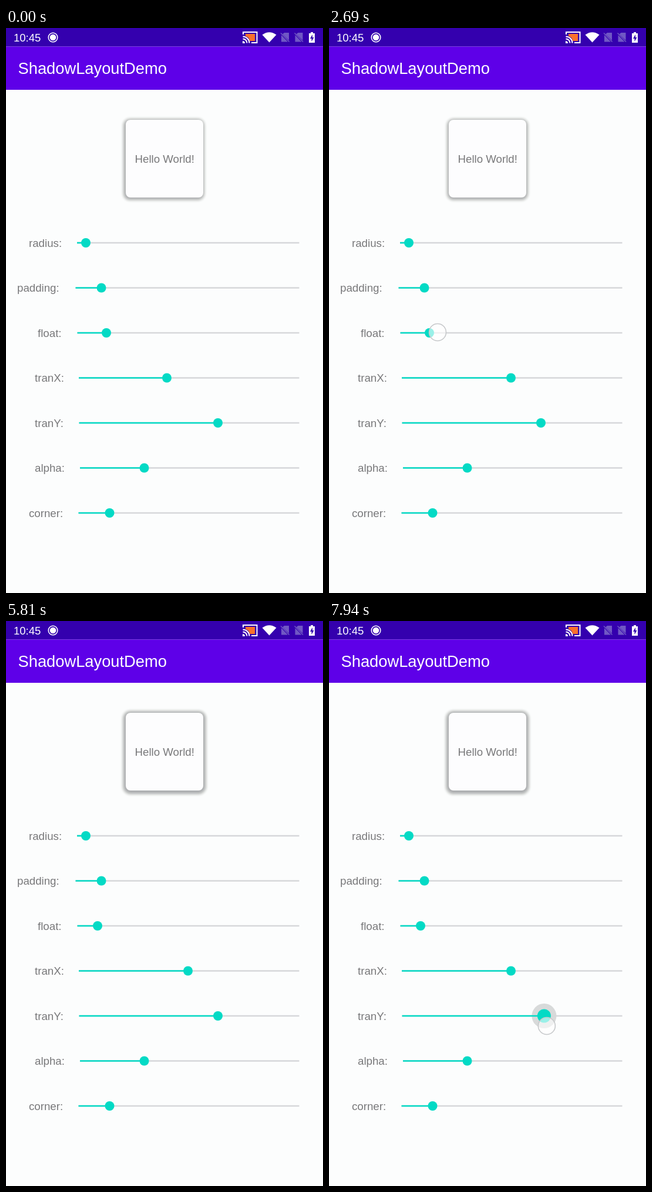
Write an HTML page that moves like this. It is 540 px wide and 960 px high and loops after 8 s.

```html
<!DOCTYPE html>
<html lang="en">
<head>
<meta charset="utf-8">
<title>ShadowLayoutDemo</title>
<style>
  html, body { margin: 0; width: 100%; height: 100%; overflow: hidden; background: #fcfdfd; }
  svg { position: absolute; left: 0; top: 0; }
  text { font-family: "Liberation Sans", Arial, sans-serif; font-size: 18.7px; fill: #78787a; }
  #card { position: absolute; left: 204px; top: 156px; width: 132px; height: 132px;
          border-radius: 8px; background: #fdfdfe; }
</style>
</head>
<body>
<div id="card"></div>
<svg id="stage" width="540" height="960" viewBox="0 0 540 960">
  <rect width="540" height="31.5" fill="#3400ae"/>
  <rect y="31.5" width="540" height="73.5" fill="#5e00e8"/>
  <text x="13" y="22.5" style="font-size:18.5px;fill:#fff">10:45</text>
  <text x="20.5" y="78" style="font-size:27.3px;fill:#fff">ShadowLayoutDemo</text>
  <circle cx="80" cy="16" r="7.8" fill="none" stroke="#fff" stroke-width="1.6"/>
  <circle cx="80" cy="16" r="5.3" fill="#fff"/>
  <!-- cast, wifi, two empty SIM slots, battery -->
  <path d="M408 10H424V22H415Q414 15 408 14Z" fill="#f8702c"/>
  <path d="M404 11V7H427.5V25H418M403.5 14.5A11 11 0 0 1 414.5 25.5M403.5 18.5A7 7 0 0 1 410.5 25.5" fill="none" stroke="#fff" stroke-width="2"/>
  <path d="M403 22A4 4 0 0 1 407 26H403Z" fill="#fff"/>
  <path d="M448.5 24.5L436.5 11.5Q448.5 3 460.5 11.5Z" fill="#fff"/>
  <g id="sim" fill="#7058c4">
    <path d="M474 8H482V21L471 10.5ZM469 12L480 23.5H469Z"/>
    <path d="M468 8.5L482.5 23.5" stroke="#7058c4" stroke-width="1.5"/>
  </g>
  <use href="#sim" x="23.5"/>
  <path d="M519 7H523V9H526V25H516V9H519Z" fill="#fff"/>
  <path d="M522 11L518 18H520.5V23L524.5 16H522Z" fill="#3400ae"/>
  <text x="219.5" y="229">Hello World!</text>
  <g id="sliders"></g>
  <circle id="touch" r="14.5" fill="#fff" fill-opacity=".6" stroke="#c6c8ca" stroke-width="1.6"/>
</svg>
<script>
const LOOP = 8000, TRACK_END = 499.5, LAG = 27;
const TEAL = '#03dac5', TRACK = '#d6d7da', RIPPLE = '#d8dada';
const FLOAT = 2, TRAN_X = 3, TRAN_Y = 4;

// label, label x, track start, thumb x
const rows = [
  ['radius:', 39, 121, 136],
  ['padding:', 19, 118.5, 162.5],
  ['float:', 54, 121.5, 171],
  ['tranX:', 49, 124, 274],
  ['tranY:', 49, 124.5, 361],
  ['alpha:', 49, 126, 235.5],
  ['corner:', 39, 123.5, 176.5],
];

// keys: [time, finger x]; y: finger height at the first and last key
const gestures = [
  { row: TRAN_X, down: 60, drag: 130, up: 2320, y: [597, 613],
    keys: [[100, 274], [1280, 205], [2250, 310]] },
  { row: FLOAT, down: 2640, drag: 2760, up: 5380, y: [517, 517],
    keys: [[2690, 185], [3050, 164], [4080, 198], [4180, 198], [5250, 156]] },
  { row: TRAN_Y, down: 5850, drag: 5940, up: 8200, y: [676, 689],
    keys: [[5930, 361], [7080, 183.5], [8100, 384]] },
];

const clamp = v => Math.max(0, Math.min(1, v));
const ease = u => u * u * (3 - 2 * u);
const mix = (a, b, u) => a + (b - a) * u;

function make(parent, tag, attrs) {
  const node = document.createElementNS('http://www.w3.org/2000/svg', tag);
  set(node, attrs);
  return parent.appendChild(node);
}
function set(node, attrs) {
  for (const name in attrs) node.setAttribute(name, attrs[name]);
}

const card = document.getElementById('card');
const touch = document.getElementById('touch');
const group = document.getElementById('sliders');
const sliders = rows.map(([label, labelX, start, rest], i) => {
  const y = 365 + 76.5 * i;
  make(group, 'text', { x: labelX, y: y + 6.7 }).textContent = label;
  const ripple = make(group, 'circle', { cy: y, r: 21, fill: RIPPLE, opacity: 0 });
  make(group, 'path', { d: `M${start} ${y}H${TRACK_END}`, stroke: TRACK, 'stroke-width': 2.3 });
  const fill = make(group, 'path', { stroke: TEAL, 'stroke-width': 2.6 });
  const thumb = make(group, 'circle', { cy: y, fill: TEAL });
  return { y, start, rest, ripple, fill, thumb };
});

function sample(keys, t) {
  if (t <= keys[0][0]) return keys[0][1];
  for (let i = 1; i < keys.length; i++) {
    const [t0, a] = keys[i - 1], [t1, b] = keys[i];
    if (t < t1) return mix(a, b, ease((t - t0) / (t1 - t0)));
  }
  return keys[keys.length - 1][1];
}

function draw(t) {
  const x = sliders.map(s => s.rest);
  const press = sliders.map(() => 0);
  touch.setAttribute('visibility', 'hidden');

  for (const { row, down, drag, up, y, keys } of gestures) {
    if (t >= drag) {
      x[row] = sample(keys, t - LAG);
      press[row] = clamp((t - drag) / 180) * clamp(1 - (t - up) / 120);
    }
    if (t >= down && t < up) {
      const first = keys[0][0], last = keys[keys.length - 1][0];
      set(touch, { visibility: 'visible', cx: sample(keys, t),
                   cy: mix(y[0], y[1], clamp((t - first) / (last - first))) });
    }
  }

  sliders.forEach((s, i) => {
    set(s.fill, { d: `M${s.start} ${s.y}H${x[i]}` });
    set(s.thumb, { cx: x[i], r: 8 + 3.5 * press[i] });
    set(s.ripple, { cx: x[i], opacity: press[i] });
  });

  const share = i => (x[i] - sliders[i].start) / (TRACK_END - sliders[i].start);
  const offset = `${(share(TRAN_X) - 0.5) * 11}px ${(share(TRAN_Y) - 0.5) * 11}px`;
  const reach = 7 - 42 * (share(FLOAT) - 0.091);
  card.style.boxShadow =
    `${offset} 5px ${reach - 3.5}px #a9abad, ${offset} 4px ${reach - 1.5}px #e2e4e0`;
}

function tick() {
  draw(performance.now() % LOOP);
  requestAnimationFrame(tick);
}
tick();
</script>
</body>
</html>
```
